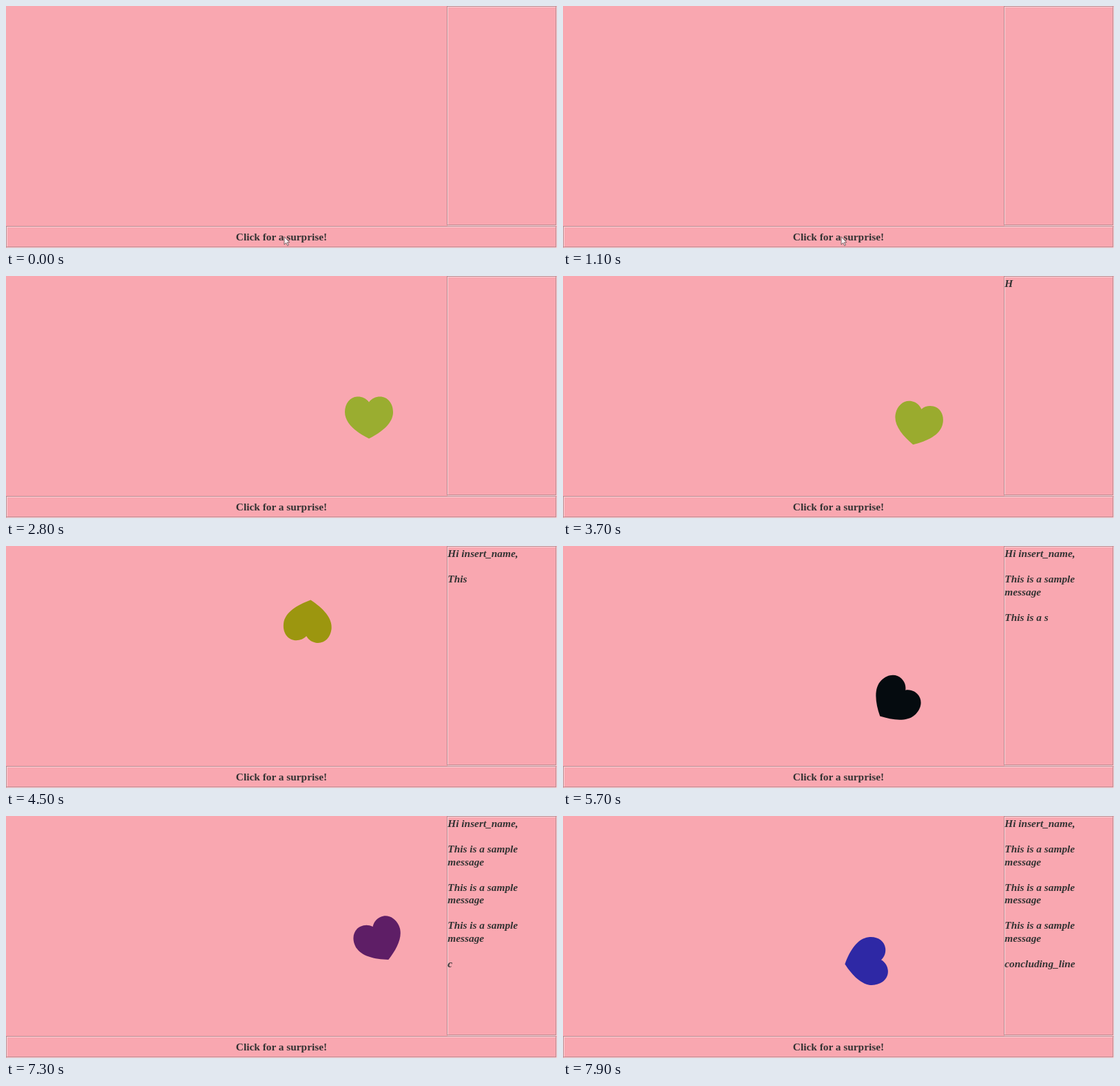
Animation of 800x352 px, one loop 8000 ms. Source, as an HTML page:

```html
<!DOCTYPE html>
<html lang="en">
<head>
<meta charset="utf-8">
<title>Click for a surprise!</title>
<style>
  html, body { margin: 0; width: 100%; height: 100%; overflow: hidden; background: #f9a7b0; }
  svg { position: absolute; left: 0; top: 0; }
  .light { fill: none; stroke: #fbd3d8; }
  .dark { fill: none; stroke: #bb8a90; }
  .label { font: bold 15.35px "Liberation Serif", serif; fill: #333; text-anchor: middle; }
  #note {
    position: absolute; left: 641.3px; top: 2px; width: 156px;
    font: italic bold 15.35px/18.55px "Liberation Serif", serif;
    color: #333; white-space: pre-wrap;
  }
</style>
</head>
<body>
<svg width="800" height="352" viewBox="0 0 800 352">
  <rect class="light" x="641.5" y="1.5" width="158" height="318"/>
  <rect class="dark" x="640.5" y=".5" width="158" height="318"/>
  <rect class="light" x="1.5" y="321.5" width="798" height="30"/>
  <rect class="dark" x=".5" y="320.5" width="798" height="30"/>
  <text class="label" x="400" y="341">Click for a surprise!</text>
  <path id="heart" d="M527 183.5C523 178 517 175.5 511 175.5C500 175.5 492 185 492 198
    C492 214 508 227 527 236.5C546 227 562 214 562 198C562 185 554 175.5 543 175.5C537 175.5 531 178 527 183.5Z"/>
  <path id="cursor" d="M404 335.5v11.5l2.7-2.5 2 4.1 1.7-.8-2-4h3.4z" fill="#fdeef0" stroke="#5a4a4c" stroke-width=".8"/>
</svg>
<div id="note"></div>
<script>
const LOOP = 8000, CLICK = 1800, TYPE_START = 3641, CHARS_PER_MS = 0.02629;
const line = "This is a sample message\n\n";
const message = "Hi insert_name,\n\n" + line.repeat(3) + "concluding_line";

// time, angle, red, green, blue
const keys = [
  [0, 0, 154, 173, 48],
  [3640, 0, 154, 173, 48],
  [4500, 186.6, 156, 150, 15],
  [5700, 404.1, 5, 11, 15],
  [6600, 567.4, 150, 18, 28],
  [7900, 803.3, 46, 40, 165],
  [8000, 821.4, 46, 40, 165]
];
const [heart, cursor, note] = ["heart", "cursor", "note"].map(id => document.getElementById(id));

function stateAt(t) {
  const i = keys.findIndex(k => k[0] > t);
  const a = keys[i - 1], b = keys[i];
  const p = (t - a[0]) / (b[0] - a[0]);
  return a.map((v, j) => v + (b[j] - v) * p);
}

function draw(now) {
  const t = now % LOOP;
  const [, angle, ...rgb] = stateAt(t);
  heart.style.display = t < CLICK ? "none" : "";
  cursor.style.display = t < CLICK ? "" : "none";
  heart.setAttribute("transform", `rotate(${angle} 480 160)`);
  heart.setAttribute("fill", `rgb(${rgb.map(Math.round)})`);
  note.textContent = message.slice(0, Math.max(0, Math.floor((t - TYPE_START) * CHARS_PER_MS)));
}

const start = performance.now();
function tick() {
  draw(performance.now() - start);
  requestAnimationFrame(tick);
}
tick();
</script>
</body>
</html>
```
